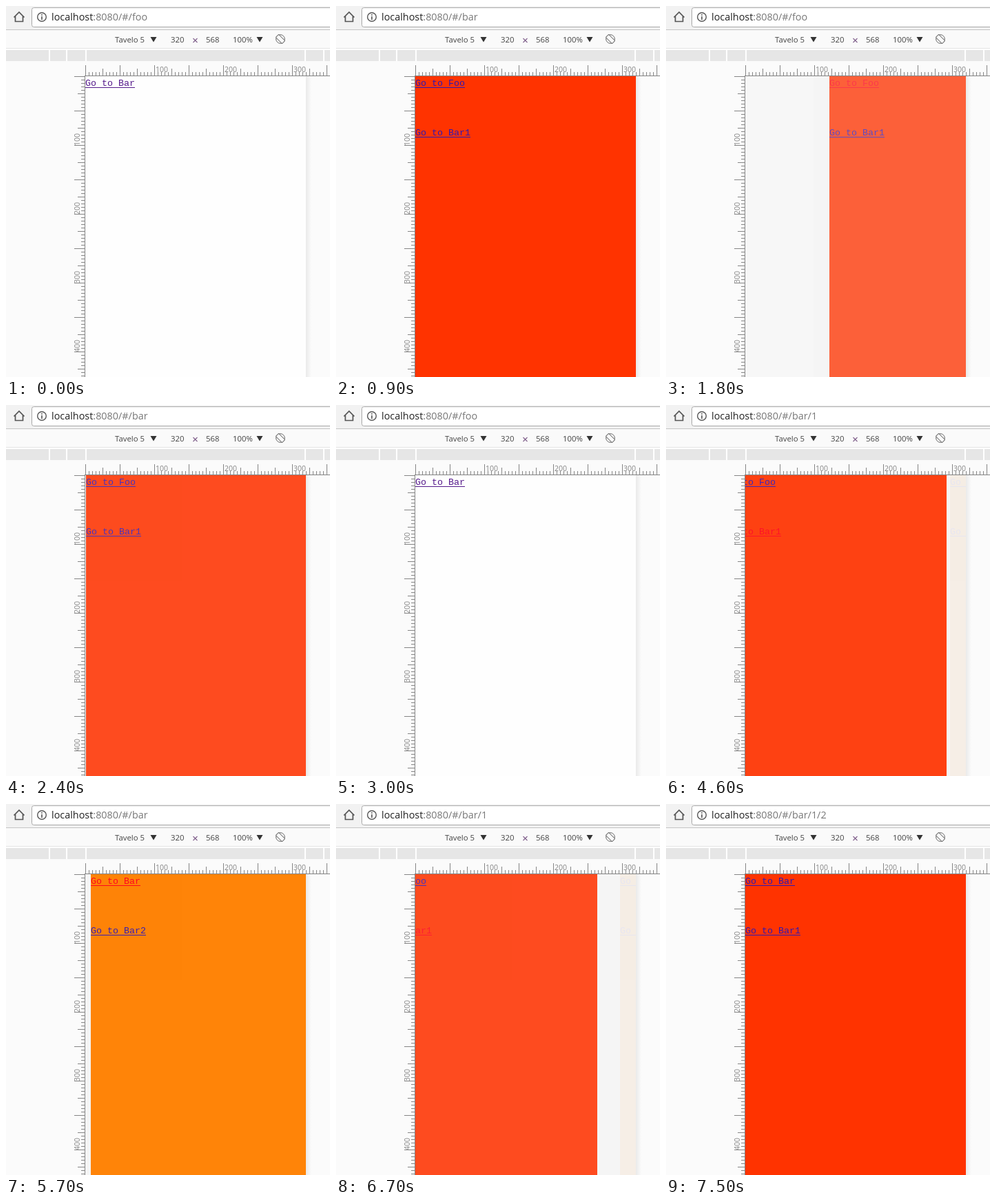
Write an HTML page that moves like this. It is 470x539 px and loops after 8000 ms.

```html
<!DOCTYPE html>
<html lang="en">
<head>
<meta charset="utf-8">
<title>Page transitions</title>
<style>
  html, body { margin: 0; width: 100%; height: 100%; overflow: hidden; background: #fbfbfb; }
  svg { display: block; }
  text { white-space: pre; }
  .ui { font: 11.4px "Open Sans", "Noto Sans", sans-serif; fill: #444; }
  .url { font: 14.4px "Open Sans", "Noto Sans", sans-serif; fill: #777; }
  .url .host { fill: #222; }
  .label { font: 10.5px "Open Sans", "Noto Sans", sans-serif; fill: #858585; }
  .link { font: 13.333px "Liberation Mono", monospace; }
</style>
</head>
<body>
<svg id="stage" width="470" height="539" viewBox="0 0 470 539">
  <defs>
    <linearGradient id="shade">
      <stop offset="0" stop-color="#eaeaea"/>
      <stop offset="1" stop-color="#fbfbfb"/>
    </linearGradient>
  </defs>
  <rect width="470" height="539" fill="#fbfbfb"/>

  <!-- address bar -->
  <rect width="470" height="34" fill="#f2f2f2"/>
  <rect x="37.5" y="2.5" width="450" height="28" rx="3" fill="#fff" stroke="#a8a8a8"/>
  <path d="M11.5 16.5L19 9l7.500 7.500M13.500 15v7.500h11V15" fill="none" stroke="#555" stroke-width="1.700"/>
  <circle cx="52" cy="16" r="6.300" fill="none" stroke="#555" stroke-width="1.400"/>
  <path d="M52 12v1.700M52 15v5" stroke="#555" stroke-width="1.600"/>
  <text class="url" x="66" y="21"><tspan class="host">localhost</tspan>:8080/#/<tspan id="route"></tspan></text>
  <rect y="34" width="470" height="1" fill="#c4c4c4"/>

  <!-- device bar -->
  <rect y="35" width="470" height="26" fill="#fafafa"/>
  <g class="ui">
    <text x="158" y="53">Tavelo 5</text>
    <text x="239" y="53">320</text>
    <text x="290" y="53">568</text>
    <text x="329" y="53">100%</text>
  </g>
  <path d="M209.500 45h9l-4.500 7.500zM363.500 45h9l-4.500 7.500z" fill="#333"/>
  <path d="M271.500 47l6 6M277.500 47l-6 6" stroke="#80608c" stroke-width="1.100"/>
  <g transform="translate(398 48)" fill="none" stroke="#666">
    <circle r="6.300"/>
    <rect x="-3" y="-6.500" width="6" height="13" rx="1" transform="rotate(-45)" fill="#fafafa"/>
  </g>
  <rect y="61" width="470" height="1" fill="#e4e4e4"/>
  <rect y="62" width="470" height="2" fill="#fff"/>
  <path d="M0 64h470v16H0z" fill="#e6e6e6"/>
  <path d="M63 64v16M88 64v16M116 64v16M434 64v16M461 64v16" stroke="#fff" stroke-width="2"/>

  <!-- viewport -->
  <rect x="435" y="102" width="8" height="437" fill="url(#shade)"/>
  <svg x="115" y="102" width="320" height="437">
    <rect width="320" height="437" fill="#f5f5f5"/>
    <g id="pages"></g>
  </svg>
  <g id="ruler"></g>
</svg>
<script>
const $ = id => document.getElementById(id);
const WIDTH = 320, LOOP = 8000, STEP = 100, DURATION = 218;
const RED = '#ff3300', BLUE = '#3018b4';

const pages = {
  'foo': { depth: 0, fill: '#fefefe', ink: '#551a8b', links: { 'bar': 'Go to Bar' } },
  'bar': { depth: 1, fill: RED, ink: BLUE, links: { 'foo': 'Go to Foo', 'bar/1': 'Go to Bar1' } },
  'bar/1': { depth: 2, fill: '#ff8000', ink: BLUE, links: { 'bar': 'Go to Bar', 'bar/1/2': 'Go to Bar2' } },
  'bar/1/2': { depth: 3, fill: RED, ink: BLUE, links: { 'bar': 'Go to Bar', 'bar/1': 'Go to Bar1' } }
};

// start of the leaving slide, destination, delay of the entering slide
const visits = [
  [-1000, 'foo'],
  [634, 'bar'], [1734, 'foo'], [2183, 'bar'], [2734, 'foo'], [3650, 'bar'],
  [4578.5, 'bar/1', 2.7], [5691, 'bar'], [6664, 'bar/1', 17.2], [7234, 'bar/1/2']
];

const clamp = x => Math.min(1, Math.max(0, x));
const slide = x => 1 - (1 - x ** 1.4) ** 2.3;
const fade = x => x < 1 ? 0.72 * x + 0.21 * x * x : 1;

function pageMarkup(name, x, opacity, clicked) {
  const { fill, ink, links } = pages[name];
  const rows = Object.entries(links).map(([to, label], i) => {
    const y = 14 + 72 * i, color = to === clicked ? '#ff0018' : ink;
    return `<g fill="${color}"><text class="link" y="${y}">${label}</text>` +
      `<rect y="${y + 2}" width="${label.length * 8}" height="1"/></g>`;
  });
  return `<g transform="translate(${Math.round(x)})" opacity="${opacity}">` +
    `<rect width="${WIDTH}" height="437" fill="${fill}"/>${rows.join('')}</g>`;
}

function drawRuler() {
  let ticks = 'M114.5 101V539M114 101.5H470', labels = '';
  for (let n = 0; n <= 440; n += 5) {
    const size = n % 50 === 0 ? 15 : n % 25 === 0 ? 10 : 5;
    if (n <= 355) ticks += `M${115.5 + n} 101v${-size}`;
    ticks += `M114 ${102.5 + n}h${-size}`;
    if (n && n % 100 === 0) {
      labels += `<text x="${n + 117}" y="96">${n}</text>` +
        `<text transform="translate(107 ${n + 103}) rotate(-90)">${n}</text>`;
    }
  }
  $('ruler').innerHTML = `<path d="${ticks}" stroke="#858585" fill="none"/><g class="label">${labels}</g>`;
}

function draw(t) {
  const i = visits.findLastIndex(v => v[0] <= t);
  const [start, name, lag = 10] = visits[i];
  const out = clamp((t - start) / DURATION);
  const into = clamp((t - start - lag) / DURATION);
  let markup = '';
  if (i && into < 1) {
    const last = visits[i - 1][1];
    const side = Math.sign(pages[name].depth - pages[last].depth);
    if (out < 1) markup = pageMarkup(last, -side * WIDTH * slide(out), 1 - fade(out), name);
    markup += pageMarkup(name, side * WIDTH * (1 - slide(into)), fade(into));
  } else {
    markup = pageMarkup(name, 0, 1);
  }
  $('route').textContent = name;
  $('pages').innerHTML = markup;
}

let shown = -1;
const origin = performance.now();
function tick() {
  const elapsed = Math.max(0, performance.now() - origin) % LOOP;
  const t = Math.floor(elapsed / STEP) * STEP;
  if (t !== shown) draw(shown = t);
  requestAnimationFrame(tick);
}
drawRuler();
tick();
</script>
</body>
</html>
```
